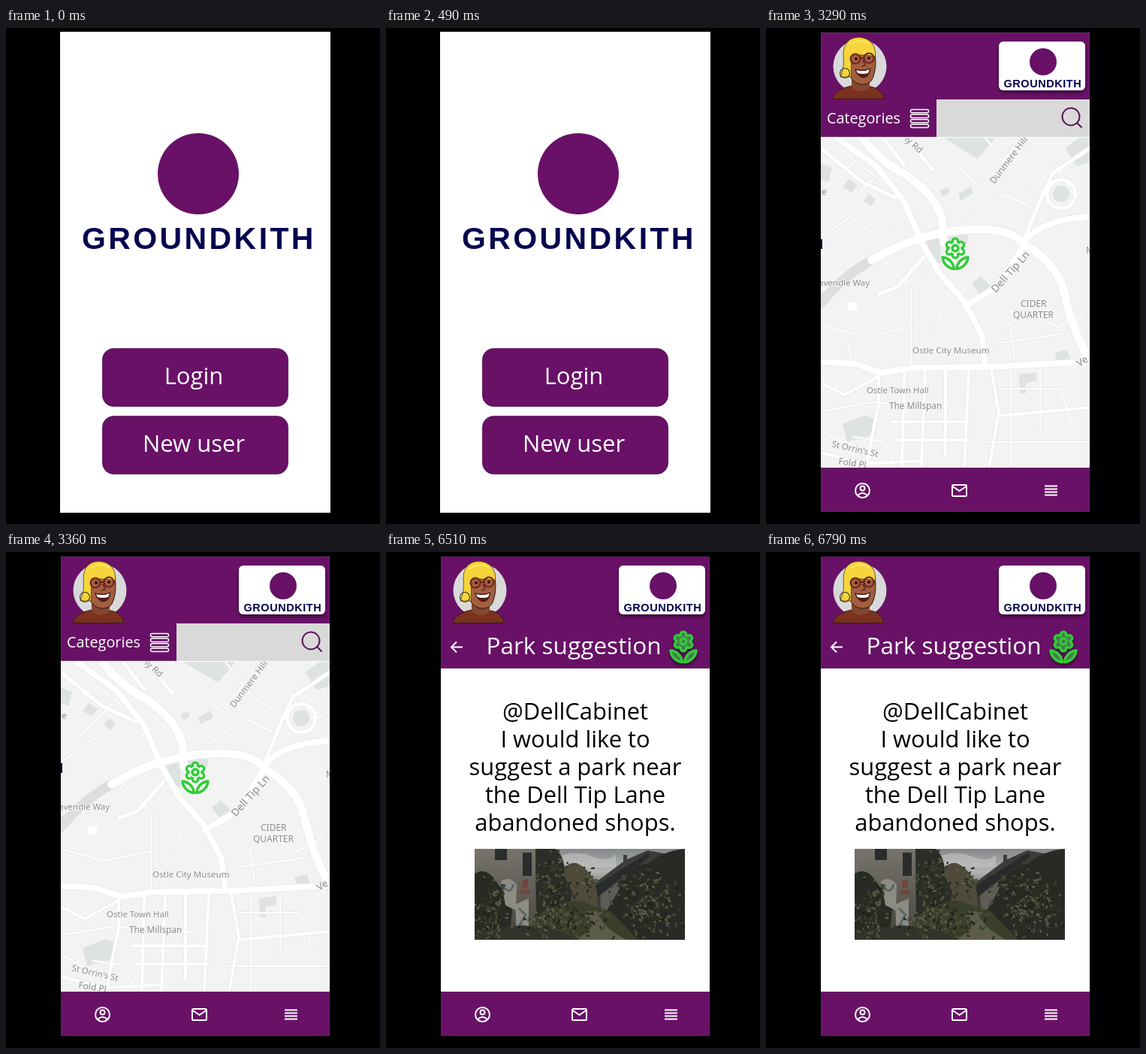
Animation, 498 px wide and 660 px high, one loop 8 s. Source, as an HTML page:

```html
<!DOCTYPE html>
<html lang="en">
<head>
<meta charset="utf-8">
<title>Community app walkthrough</title>
<style>
  html, body { margin: 0; width: 100%; height: 100%; overflow: hidden; background: #000; }
  svg { display: block; width: 100%; height: 100%; }
  text { font-family: "Open Sans", "Noto Sans", sans-serif; }
  .brand { font-family: "Liberation Sans", Arial, sans-serif; font-weight: 700; fill: #05044f; }
  .ui { fill: #fff; }
  .mid { text-anchor: middle; }
  .line { fill: none; stroke: #fff; stroke-width: 2; }
  .panel { fill: #681167; stroke: #4f0f4e; stroke-width: .8; }
  .map text { font-family: "Noto Sans", sans-serif; font-weight: 500; font-size: 12px; fill: #8d8d8d;
    stroke: #f6f6f6; stroke-width: 2px; paint-order: stroke; }
  .road { fill: none; stroke-linejoin: round; stroke-linecap: round; }
</style>
</head>
<body>
<svg viewBox="0 0 498 660" xmlns="http://www.w3.org/2000/svg">
  <defs>
    <clipPath id="mapClip"><rect x="73" y="146" width="358" height="439"/></clipPath>
    <clipPath id="photoClip"><rect x="118" y="395" width="280" height="121"/></clipPath>
    <linearGradient id="sky" x1="0" y1="0" x2="0" y2="1">
      <stop offset="0" stop-color="#85898b"/><stop offset=".25" stop-color="#b3b5b3"/><stop offset=".6" stop-color="#3a4031"/>
    </linearGradient>
    <linearGradient id="wall" x1="0" y1="0" x2="0" y2="1">
      <stop offset="0" stop-color="#77746c"/><stop offset="1" stop-color="#45433d"/>
    </linearGradient>
    <filter id="shade" x="-20%" y="-20%" width="140%" height="150%">
      <feDropShadow dx="0" dy="3" stdDeviation="2" flood-opacity=".5"/>
    </filter>

    <g id="flower" stroke="#31cb37" stroke-width="3.4">
      <path d="M-17 12A17 17 0 0 0 -1.700 27.500 17 17 0 0 0 -17 12ZM17 12A17 17 0 0 1 1.700 27.500 17 17 0 0 1 17 12Z" stroke-linejoin="round"/>
      <g id="petals"></g>
      <circle r="7.500" stroke="none"/>
      <circle r="4"/>
    </g>

    <g id="avatar" stroke-linecap="round" stroke-linejoin="round">
      <circle cx="125" cy="51" r="35.500" fill="#d9d9d9"/>
      <path d="M89 94C92 84 103 79 114 77L140 78C150 80 156 87 157 94Z" fill="#7a311d" stroke="#2e1512" stroke-width=".8"/>
      <path d="M114 60V78C119 86 133 86 138 78V66Z" fill="#84472f"/>
      <path d="M109 35C108 54 110 64 116 70 123 77 136 77 141 69 146 59 147 46 145 33Z" fill="#a35e40" stroke="#2e1512"/>
      <path d="M113 65H99C103 56 104 46 103 35 103 21 111 12.500 123 12.500 137 12.500 147 22 145.500 38 137 36 126 35 114 37Z" fill="#f5d53b" stroke="#4d3d14" stroke-width=".8"/>
      <path d="M112 22C119 16 130 16 138 21" fill="none" stroke="#ffe66c" stroke-width="2"/>
      <g fill="none" stroke="#6f211c" stroke-width="2">
        <circle cx="119" cy="41" r="6.500"/><circle cx="137" cy="40" r="6.500"/><path d="M125.500 40h5"/>
      </g>
      <circle cx="120" cy="41" r="2" fill="#24130f"/><circle cx="137" cy="40" r="2" fill="#24130f"/>
      <path d="M129 43C133 49 133 50 128 51" fill="none" stroke="#5b2a1e" stroke-width="1.500"/>
      <path d="M119 55Q130 58 139 54 137 66 129 66 121 64 119 55Z" fill="#5a1917" stroke="#2e1512"/>
      <path d="M120 56Q130 59 138 55L136 60Q129 62 122 60Z" fill="#fff"/>
      <circle cx="105" cy="60" r="6.500" fill="none" stroke="#3f301a" stroke-width="1.200"/>
    </g>

    <g id="chrome">
      <rect x="73" y="6" width="358" height="638" fill="#fff"/>
      <rect class="panel" x="73.400" y="585.400" width="357.200" height="58.200"/>
      <g class="line">
        <circle cx="128.500" cy="615.500" r="9.500"/>
        <circle cx="128.500" cy="612.500" r="3"/>
        <path d="M122 622Q128.500 615.500 135 622"/>
        <rect x="248" y="608" width="19" height="15" rx="1.500"/>
        <path d="M248.500 610L257.500 616 266.500 610"/>
        <path d="M371 609.500h17m-17 4h17m-17 4h17m-17 4h17"/>
      </g>
    </g>

    <g id="top">
      <use href="#avatar"/>
      <rect x="310" y="18" width="115" height="65" rx="6" fill="#fff" filter="url(#shade)"/>
      <circle cx="369" cy="45" r="18" fill="#681167"/>
      <text class="brand" x="316.500" y="79" font-size="14.500" letter-spacing=".55">GROUNDKITH</text>
    </g>
  </defs>

  <rect width="498" height="660" fill="#000"/>

  <g class="screen">
    <rect x="72" y="5" width="360" height="640" fill="#fff"/>
    <circle cx="256" cy="194" r="54" fill="#681167"/>
    <text class="brand" x="101" y="294" font-size="41" letter-spacing="3.400">GROUNDKITH</text>
    <rect class="panel" x="128.400" y="426.400" width="247.200" height="77.200" rx="15"/>
    <rect class="panel" x="128.400" y="516.400" width="247.200" height="77.200" rx="15"/>
    <g class="ui mid" font-size="31">
      <text x="250" y="474">Login</text>
      <text x="250" y="564">New user</text>
    </g>
  </g>

  <g class="screen">
    <use href="#chrome"/>
    <path class="panel" d="M73.400 6.400H430.600V95H227V144.600H73.400Z"/>
    <use href="#top"/>
    <rect x="227" y="95" width="204" height="50" fill="#d9d9d9"/>
    <text class="ui" x="81" y="127" font-size="19.800">Categories</text>
    <g id="bars" class="line" style="stroke-width:1.500"></g>
    <g fill="none" stroke="#5d155c" stroke-width="2" stroke-linecap="round">
      <circle cx="406" cy="118" r="11.500"/><path d="M414.500 126.500L420 132"/>
    </g>
    <g class="map" clip-path="url(#mapClip)">
      <rect x="73" y="146" width="358" height="439" fill="#f3f3f3"/>
      <path fill="#dfe2e2" d="M236 146H305L296 158 282 174 262 162ZM398 160L418 146H431V178L414 184ZM204 279L232 277 233 314 216 306ZM238 268L270 266 268 288 240 298ZM274 340L286 330 299 343 285 355ZM102 527L132 515 146 521V541L108 551ZM337 461L360 458V470L346 472V486H338ZM73 180L88 186 83 205 73 201ZM110 201l12 8-8 10-12-8ZM137 221l9 7-6 9-10-7ZM256 220l17-9 3 9-17 9ZM232 216l10-4 3 7-10 5ZM384 433l16-5 7 16-17 4ZM73 352L84 346 89 358 73 370Z"/>
      <circle cx="393" cy="221" r="11" fill="#dfe2e2"/>
      <path d="M73 366Q105 328 141 309" class="road" stroke="#dedede" stroke-width="13"/>
      <g id="roads" class="road"></g>
      <rect x="109" y="365" width="12" height="11" fill="#fff"/>
      <rect x="73" y="281" width="2" height="13" fill="#1b1150"/>
      <g id="labels"></g>
      <use href="#flower" x="252" y="293" fill="#eefbee"/>
    </g>
  </g>

  <g class="screen">
    <use href="#chrome"/>
    <rect class="panel" x="73.400" y="6.400" width="357.200" height="148.200"/>
    <use href="#top"/>
    <path class="line" d="M102 126.500H87M94 119.500L87 126.500 94 133.500"/>
    <text class="ui" x="133.500" y="136" font-size="31.500">Park suggestion</text>
    <g filter="url(#shade)"><use href="#flower" x="396" y="119" fill="#477a50"/></g>
    <g id="message" class="mid" font-size="30.900"></g>
    <g clip-path="url(#photoClip)">
      <rect x="118" y="395" width="280" height="121" fill="url(#sky)"/>
      <path d="M229 406Q250 396 274 405T306 402V419Q270 422 229 414Z" fill="#c9cac7" opacity=".55"/>
      <path d="M230 430Q240 412 254 414 268 420 278 438L294 452V490H224Z" fill="#4f4a3a"/>
      <path d="M118 395H199L204 420 210 516H118Z" fill="url(#wall)"/>
      <path d="M145 395h16v15h-16ZM182 400h12v31h-12Z" fill="#2b2d2c"/>
      <path d="M118 428Q134 418 147 439L169 469 164 516H118Z" fill="#272b23"/>
      <path d="M153 438Q165 430 174 443L173 477 159 470ZM172 469L190 461V504L174 508Z" fill="#8d8c83"/>
      <path d="M156 444q9 14 14-2M177 474l9 9-8 13 9 3" fill="none" stroke="#58666c" stroke-width="3"/>
      <path d="M181 438l8-3v11l-8 2ZM179 450h13v5h-13Z" fill="#74453c"/>
      <path d="M199 395H226Q240 408 237 430L248 452 242 489 200 500Z" fill="#2b2e27"/>
      <path d="M280 439L316 412V403H321V409L348 397 398 406V502H284Z" fill="#3c3c38"/>
      <path d="M279 444L330 412 349 400 352 405 305 440 282 459Z" fill="#292b2b"/>
      <path d="M285 457L310 438V467L287 480Z" fill="#5d5c55"/>
      <path d="M310 450Q324 414 348 415 370 397 398 395V516H282L291 482Z" fill="#282b24"/>
      <path d="M188 516Q201 474 229 471 249 458 270 469L299 478 336 516Z" fill="#3a3f2b"/>
      <path d="M266 478Q279 494 271 503L254 516H320Q288 500 281 478Z" fill="#5d5c48"/>
      <path d="M118 506Q185 489 232 505L258 516H118Z" fill="#30342b"/>
      <g id="leaves" stroke-width="2.500" stroke-linecap="round"></g>
    </g>
  </g>
</svg>

<script>
  const LOOP = 8000;
  const STARTS = [0, 3290, 6510];
  const $ = id => document.getElementById(id);
  const repeat = (n, draw) => Array.from({ length: n }, (_, i) => draw(i)).join("");

  // Outlined petals first, then their fills, so only the scalloped rim stays.
  const petals = attrs => repeat(6, i => `<circle cy="-9" transform="rotate(${i * 60})" ${attrs}/>`);
  $("petals").innerHTML = petals('r="3.8"') + petals('r="2.2" stroke="none"');
  $("bars").innerHTML = repeat(4, i =>
    `<rect x="192.500" y="${108.5 + i * 6.6}" width="24" height="4.300" rx="2"/>`);

  // Road widths and their centre lines.
  const roads = [
    [2, "M73 216L119 177 158 207M100 244L142 202M73 280L112 251 148 276 188 238M150 301L185 340 216 322M193 347V450M225 401L236 371 263 389M270 255L319 222 354 239M292 146L325 190 367 218M250 180L287 213 333 155M385 180L411 224 431 211"],
    [2, "M315 401L345 377 389 398 421 381M306 420L396 407M331 441L325 394M73 395L131 411 193 398M116 452L108 414M73 510L143 498 247 506M116 544L156 550 172 580M73 536L104 552M310 480H392L408 530M326 455V584M365 448V540M296 551H431"],
    [4, "M73 472L105 488 151 463M150 455V500L133 585M184 458L181 585M212 455L207 585M239 455V567M270 456L264 585M167 524H268M172 548H268M300 455L310 512 297 585M73 565L130 580 205 576M310 516L431 505"],
    [5, "M156 146L184 183M188 146L221 188M73 160L128 205 173 226M342 286L367 225 382 193 431 160M393 202a19 19 0 1 0 .1 0M210 305L176 344 151 354"],
    [8, "M94 146L147 184 184 231 207 285 230 325 264 364 287 408 292 451M265 370L307 345 343 290M73 444L119 447 153 459 198 452 297 451 431 444M342 287Q364 255 431 251"],
    [11, "M128 146Q153 178 184 194 229 224 235 258L237 286M141 309Q197 275 261 269T345 289Q388 313 397 352T419 420L431 443"]
  ];
  const stroke = (color, extra) => roads.map(([w, d]) =>
    `<path d="${d}" stroke="${color}" stroke-width="${w + extra}"/>`).join("");
  $("roads").innerHTML = stroke("#e7e8e8", 1.6) + stroke("#fff", 0);

  const label = (text, x, y, turn = 0, size = 12) =>
    `<text transform="translate(${x} ${y}) rotate(${turn})" style="font-size:${size}px">${text}</text>`;
  $("labels").innerHTML = [
    label("ly Rd", 184, 149, 42),
    label("Dunmere Hill", 304, 208, -53),
    label("le", 71, 222),
    label("avendle Way", 70, 343, 0, 11.5),
    label("Dell Tip Ln", 306, 353, -48, 14),
    label("CIDER", 339, 371),
    label("QUARTER", 329, 386),
    label("Ostle City Museum", 195, 433, 0, 11.6),
    label("Ostle Town Hall", 134, 486, 0, 11.4),
    label("The Millspan", 164, 507, 0, 11.8),
    label("St Orrin's St", 87, 557, 13, 11.5),
    label("Fold Pl", 96, 580, 9),
    label("Ve", 417, 451, -32, 13),
    label("M", 426, 300)
  ].join("");

  const message = ["@DellCabinet", "I would like to", "suggest a park near",
    "the Dell Tip Lane", "abandoned shops."];
  $("message").innerHTML = message.map((line, i) =>
    `<text x="252" y="${223 + i * 37}">${line}</text>`).join("");

  // Seeded dabs of foliage: count, centre and spread of each patch.
  let seed = 7;
  const random = () => (seed = seed * 16807 % 2147483647) / 2147483647;
  const spread = () => random() + random() - 1;
  const greens = ["#1e221b", "#2b3025", "#3b412d", "#4a4f38", "#5b5d4a"];
  const foliage = (n, cx, cy, rx, ry) => repeat(n, () => {
    const x = cx + spread() * rx, y = cy + spread() * ry;
    const color = greens[Math.floor(random() * greens.length)];
    return `<path d="M${x} ${y}l${spread() * 4} ${spread() * 4}" stroke="${color}"/>`;
  });
  $("leaves").innerHTML = foliage(120, 138, 478, 30, 48) + foliage(120, 222, 445, 24, 52)
    + foliage(220, 350, 468, 58, 50) + foliage(170, 235, 492, 70, 26) + foliage(50, 265, 440, 20, 28);

  const screens = document.querySelectorAll(".screen");
  function render(time) {
    const t = time % LOOP;
    const active = STARTS.filter(start => t >= start).length - 1;
    screens.forEach((screen, i) => { screen.style.display = i === active ? "" : "none"; });
  }

  const began = performance.now();
  function tick() {
    render(performance.now() - began);
    requestAnimationFrame(tick);
  }
  tick();
</script>
</body>
</html>
```
